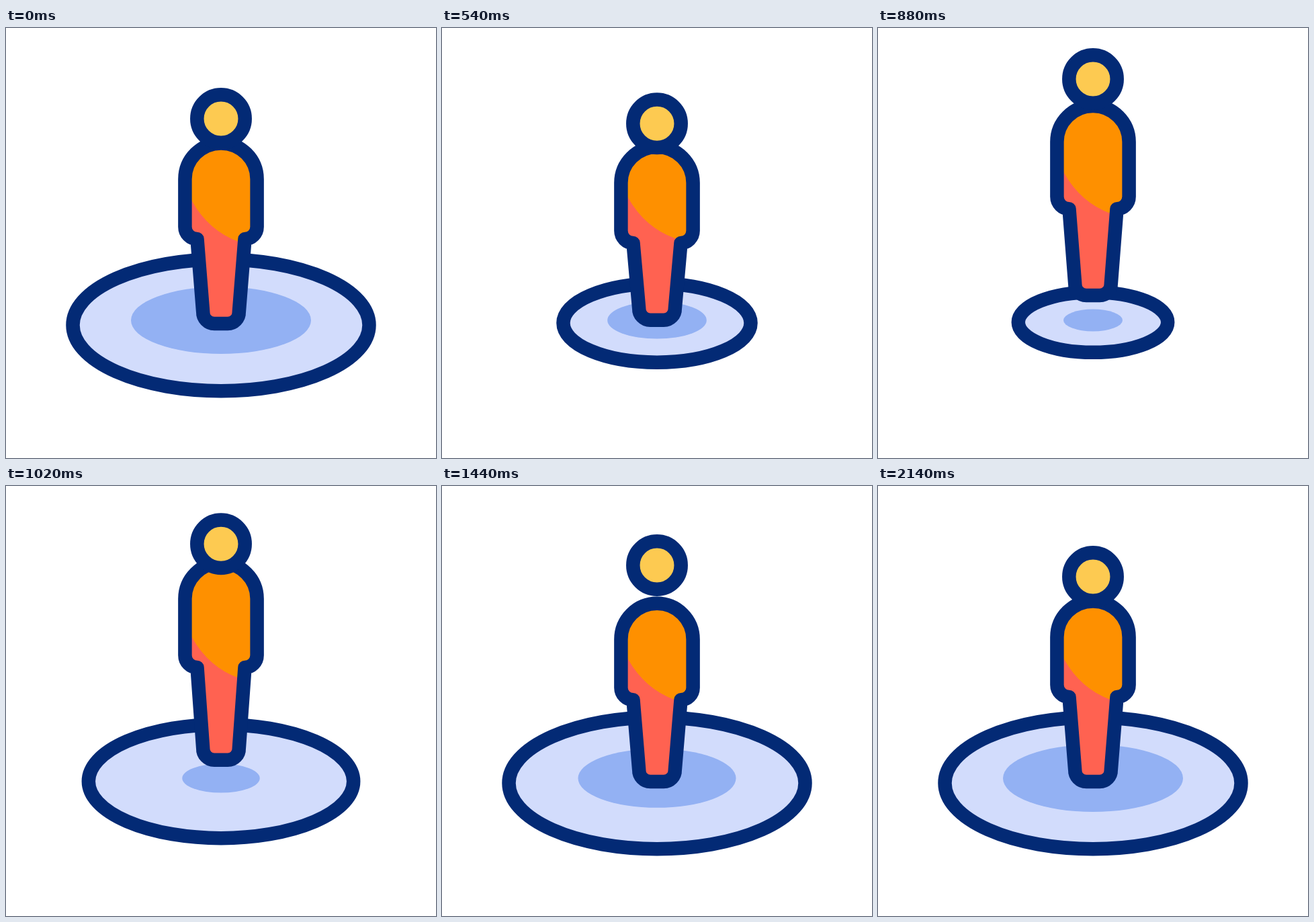
Animation, 640 px wide and 640 px high, one loop 3 s. Source, as an HTML page with a canvas:

```html
<!DOCTYPE html>
<html lang="en">
<head>
<meta charset="utf-8">
<title>Jumping figure</title>
<style>
html, body { margin: 0; width: 100%; height: 100%; overflow: hidden; background: #fff; }
canvas { display: block; width: 100vw; height: 100vh; object-fit: contain; }
</style>
</head>
<body>
<canvas id="stage" width="640" height="640"></canvas>
<script>
const ctx = document.getElementById('stage').getContext('2d');
const LOOP = 3000, STEP = 20, CX = 320;
const NAVY = '#032a75', YELLOW = '#fdca51', ORANGE = '#fe9000',
      CORAL = '#ff6251', PALE = '#d2dcfc', BLUE = '#93b1f3';

const clamp = u => Math.min(1, Math.max(0, u));
const ease = u => u * u * (3 - 2 * u);
const mix = (a, b, k) => a + (b - a) * k;

// Each move eases from the pose before it: to(start, end, ...pose).
const to = (start, end, ...pose) => ({ start, end, pose });
const follow = (t, rest, ...moves) => moves.reduce((now, { start, end, pose }) => {
  const k = ease(clamp((t - start) / (end - start)));
  return now.map((value, i) => mix(value, pose[i], k));
}, rest);

// crouch, jump, fall, rebound, settle
const headY = t => follow(t, [135],
  to(100, 420, 159.5), to(420, 830, 76), to(925, 1300, 140), to(1300, 1460, 117), to(1540, 2140, 135))[0];

const lift = t => follow(t, [0], to(445, 880, 42), to(925, 1227, 0))[0];

// How far the body drops: squash is positive, stretch is negative.
const shoulderDrop = t => follow(t, [0],
  to(100, 400, 10.7), to(600, 1060, -25.8), to(1060, 1373, 3.5), to(1400, 2140, 0))[0];
const hipDrop = t => follow(t, [0],
  to(100, 450, 11), to(650, 1060, -12.5), to(1060, 1373, 4.3), to(1400, 2140, 0))[0];

// Poses of the ring: rx, ry, centre y
const RING = [220.5, 98, 442.2];
const ring = t => follow(t, RING,
  to(180, 720, 111.2, 44.8, 438), to(882, 1115, 246.2, 107.3, 440.4),
  to(1115, 1250, 172.5, 72.2, 437.3), to(1250, 1420, ...RING));

const glowRadius = t => follow(t, [134],
  to(110, 810, 44), to(952, 1258, 153), to(1258, 1470, 115.5), to(1540, 2140, 134))[0];

function ellipse(y, rx, ry, fill, outlined) {
  ctx.beginPath();
  ctx.ellipse(CX, y, rx, ry, 0, 0, 2 * Math.PI);
  if (fill) { ctx.fillStyle = fill; ctx.fill(); }
  if (outlined) ctx.stroke();
}

function drawGround(t) {
  const [rx, ry, y] = ring(t), glow = glowRadius(t);
  ellipse(y, rx, ry, PALE);
  ellipse(435, glow, glow * 0.373, BLUE);
  ellipse(y, rx, ry, null, true);
}

function drawBody(t) {
  const shoulder = 225 + shoulderDrop(t), hip = 296 + hipDrop(t), crotch = hip + 18.1;
  const body = new Path2D(`M266.4 ${shoulder} V${hip}
    A18.1 18.1 0 0 0 284.5 ${crotch} L293.2 422.6
    A16.9 16.9 0 0 0 310 440 H330 A16.9 16.9 0 0 0 346.8 422.6
    L355.5 ${crotch} A18.1 18.1 0 0 0 373.6 ${hip}
    V${shoulder} A53.6 53.6 0 0 0 266.4 ${shoulder} Z`);
  const shirt = new Path2D('M260 100 V230 L277 258 Q302 302 346 318 L380 331 V100 Z');

  ctx.save();
  ctx.translate(0, -lift(t));
  ctx.fillStyle = CORAL;
  ctx.fill(body);
  ctx.save();
  ctx.clip(body);
  ctx.fillStyle = ORANGE;
  ctx.fill(shirt);
  ctx.restore();
  ctx.stroke(body);
  ctx.restore();
}

function frame(now) {
  const t = Math.floor(now % LOOP / STEP) * STEP;
  ctx.fillStyle = '#fff';
  ctx.fillRect(0, 0, 640, 640);
  ctx.strokeStyle = NAVY;
  ctx.lineWidth = 20.5;
  ctx.lineJoin = 'round';
  drawGround(t);
  drawBody(t);
  ellipse(headY(t), 35.7, 35.7, YELLOW, true);
}

let start;
function loop(now) {
  start ??= now;
  frame(now - start);
  requestAnimationFrame(loop);
}
frame(0);
requestAnimationFrame(loop);
</script>
</body>
</html>
```
